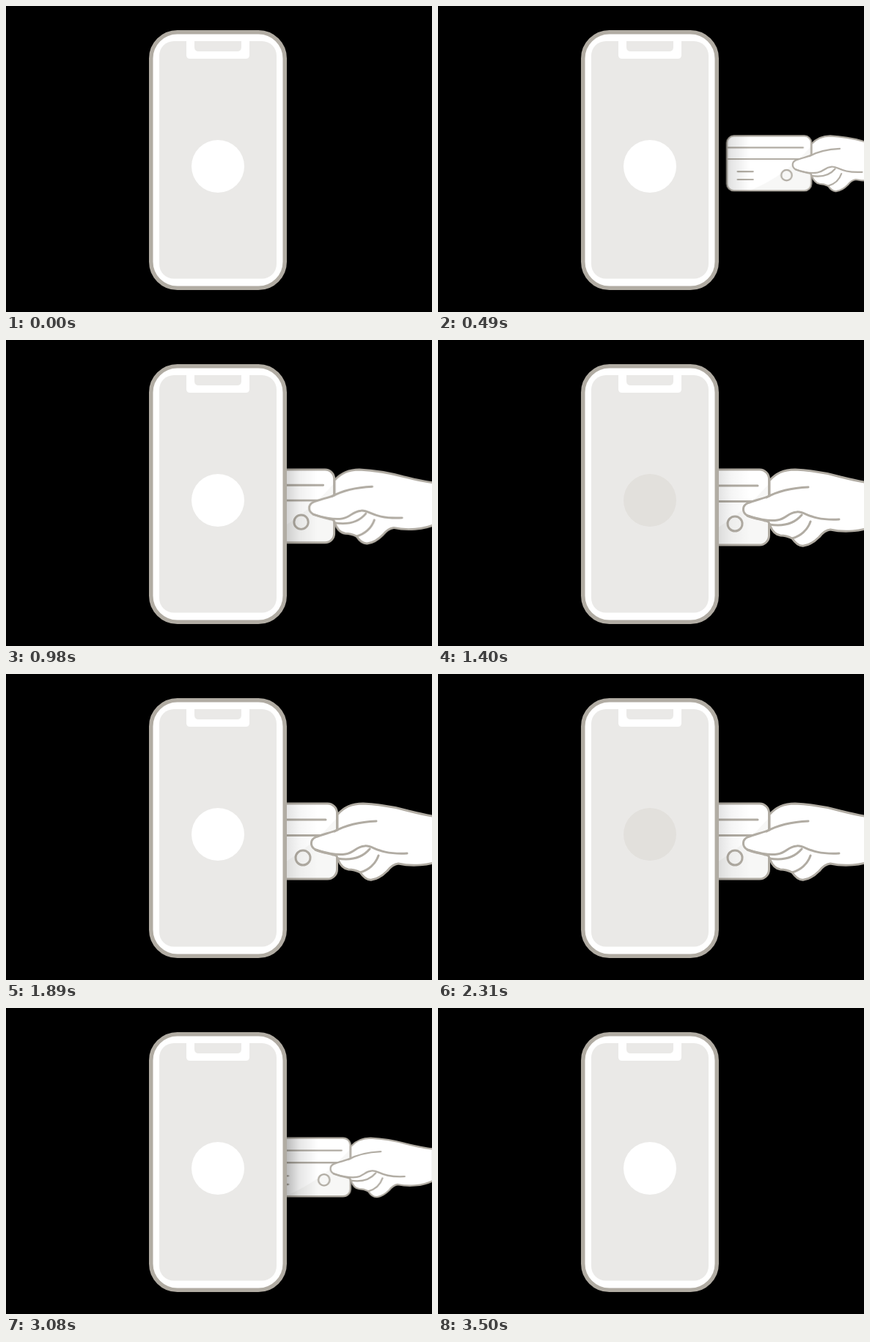
An HTML page for the animation above (4.13 s loop, 581 px wide and 418 px high).

```html
<!DOCTYPE html>
<html lang="en">
<head>
<meta charset="utf-8">
<title>Card held to a phone</title>
<style>
  html, body { margin: 0; width: 100%; height: 100%; overflow: hidden; background: #000; }
  svg { display: block; width: 581px; height: 418px; }
  .line { fill: none; stroke: #b1aca3; stroke-width: 3; stroke-linecap: round; stroke-linejoin: round; }
  .white { fill: #fff; }
  .screen { fill: #eae9e7; }

  /* Paused animations; the script moves them along through --reach and --time. */
  .slide, .shade, .tag { animation: slide 1100ms linear both paused; animation-delay: calc(var(--reach, 0) * -1ms); }
  .shade { animation-name: shade; }
  .tag { animation: glow 4130ms ease-in-out both paused; animation-delay: calc(var(--time, 0) * -1ms); }

  @keyframes slide {
    0%, 19.1% { transform: translate(590px, 177px) scale(.69); }
    25.5% { transform: translate(537px, 177px) scale(.692); }
    31.8% { transform: translate(485px, 177px) scale(.697); }
    44.55% { transform: translate(394px, 177.5px) scale(.726); }
    54.55% { transform: translate(347px, 177.5px) scale(.774); }
    70% { transform: translate(300.5px, 177.5px) scale(.887); }
    82% { transform: translate(294.5px, 177px) scale(.95); }
    100% { transform: translate(293px, 177px) scale(1); }
  }
  @keyframes shade {
    0%, 70% { opacity: 1; }
    100% { opacity: .4; }
  }
  @keyframes glow {
    0%, 22.9% { fill: #fff; }
    33.9% { fill: #e2e0dc; }
    44.9% { fill: #fff; }
    55.9% { fill: #e2e0dc; }
    64%, 100% { fill: #fff; }
  }
</style>
</head>
<body>
<svg viewBox="0 0 581 418">
  <defs>
    <linearGradient id="shadow">
      <stop offset="0" stop-color="#000" stop-opacity=".27"/>
      <stop offset=".4" stop-color="#000" stop-opacity=".1"/>
      <stop offset="1" stop-color="#000" stop-opacity="0"/>
    </linearGradient>
  </defs>

  <g class="slide">
    <rect class="white" width="158.5" height="103" rx="13"/>
    <path d="M45 102 Q110 75 158 20 V90 Q158 102 146 102 Z" fill="#f7f7f6"/>
    <rect class="line" width="158.5" height="103" rx="13"/>
    <path class="line" d="M1 22 H143 M1 43.5 H142 M20 67 H49 M20 82 H49"/>
    <circle class="line" cx="112" cy="74" r="10"/>
  </g>

  <rect class="shade" x="383" y="170" width="42" height="120" fill="url(#shadow)"/>

  <g class="slide">
    <path class="line white" style="fill:#fff" d="M303 19 C288 18 272 14 256 10 C238 5 214 1 194 0
      C178 0 168 5 159 15 V36 C150 40 138 42 129 46 C121 50 122 59 129 63 C136 66 146 68 153 70
      Q158 70 159 74 C162 83 166 89 174 90 C180 90 186 92 190 94 C194 100 200 105 206 104
      C214 103 221 98 227 92 Q234 83 242 82 C260 86 285 85 303 76"/>
    <path class="line" d="M155 38 C171 29 190 25 212 24
      M129 63 C140 67 158 71 170 69 C182 67 184 59 196 58 C208 56 212 70 254 68
      M159 75 C178 78 193 74 203 62
      M190 94 C201 91 211 83 215 71"/>
  </g>

  <rect x="197.75" y="35.75" width="182.5" height="349.5" rx="36" fill="#fff" stroke="#b1aca3" stroke-width="5.5"/>
  <rect class="screen" x="209" y="48" width="160" height="324.5" rx="20"/>
  <path class="white" d="M246 47 H332 V67 Q332 72 327 72 H251 Q246 72 246 67 Z"/>
  <path class="screen" d="M257 48 H321 V56 Q321 62 315 62 H263 Q257 62 257 56 Z"/>
  <circle class="tag" cx="289" cy="219" r="36" fill="#fff"/>
</svg>
<script>
  const LOOP = 4130, STEP = 70, MIRROR = 3680;
  const style = document.documentElement.style;
  const start = performance.now();

  function draw() {
    const elapsed = (performance.now() - start) % LOOP;
    const time = Math.floor(elapsed / STEP) * STEP;
    style.setProperty('--time', time);
    // The way out retraces the way in.
    style.setProperty('--reach', Math.max(0, Math.min(time, MIRROR - time)));
    requestAnimationFrame(draw);
  }
  draw();
</script>
</body>
</html>
```
